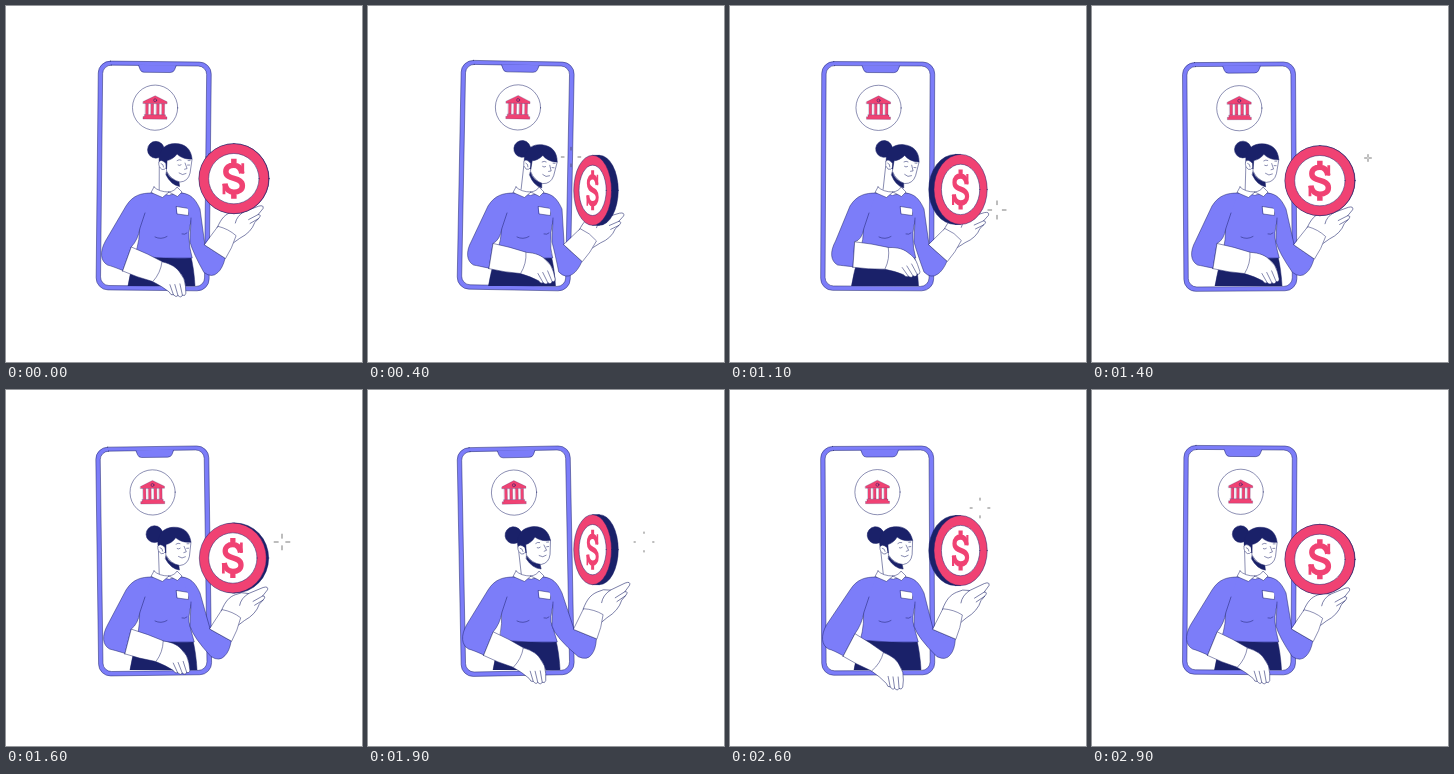
Recreate the animation shown at these times as an HTML page. Size 356x356 px, loop 3000 ms.

```html
<!DOCTYPE html>
<html lang="en">
<head>
<meta charset="utf-8">
<title>Mobile banking</title>
<style>
  html, body { margin: 0; width: 100%; height: 100%; overflow: hidden; background: #fff; }
  svg { display: block; width: 100vw; height: 100vh; }
  .line { fill: none; }
  .skin { fill: #fff; }
  .shirt { fill: #7c7df9; }
  .navy { fill: #1a2169; }
  .pink { fill: #f04273; }
</style>
</head>
<body>
<svg viewBox="0 0 356 356" stroke="#1a2169" stroke-width=".5" stroke-linejoin="round" stroke-linecap="round">
  <defs>
    <clipPath id="screen"><rect x="95" y="60" width="104" height="220" rx="8"/></clipPath>
  </defs>

  <g id="phone">
    <rect class="shirt" x="91.200" y="56" width="113" height="228.800" rx="12"/>
    <rect class="skin" x="95.600" y="60" width="104" height="220.400" rx="8.500"/>
    <path class="shirt" stroke="none" d="M131 59.500H169.500L167.500 64Q166.500 66.800 163 66.800H137Q134 66.800 133 64Z"/>
    <path class="line" d="M131.500 60L133 64Q134 66.800 137 66.800H163Q166.500 66.800 167.500 64L169 60"/>
  </g>

  <g id="bank">
    <circle class="skin" r="22.600"/>
    <g class="pink" stroke-width=".2">
      <path d="M-12-6L0-12L12-6V-4H-12Z"/>
      <path d="M-9.500-4h2.800v11h-2.800ZM-4.200-4h2.800v11h-2.800ZM1.400-4h2.800v11h-2.800ZM6.700-4h2.800v11h-2.800Z"/>
      <path d="M-10.500 7H10.500V9H12V11.500H-12V9H-10.500Z"/>
      <circle cy="-7.400" r="1.500" stroke-width=".5"/>
    </g>
  </g>

  <g clip-path="url(#screen)"><path id="skirt" class="navy"/></g>
  <path id="torso" class="shirt"/>

  <g id="head">
    <path class="skin" stroke="none" d="M153 158V184L163 189L171 183V168Z"/>
    <path class="line" d="M153.200 161V184"/>
    <path class="navy" d="M160.500 166Q164 174 173 175.500L173.500 180.500Q165 179 160 169Z"/>
    <path class="skin" d="M160 150L160.500 165Q165 174 174 176Q182 175.500 184 167L186 153L176 143Z"/>
    <circle class="navy" cx="149.800" cy="143.800" r="8.400"/>
    <path class="navy" d="M153 156C152 143 160 137.500 169 137.500C179 137.500 185 143 186 153C179 153.500 174 151 171 148C168 152 164 154 161 154.500L160.500 163Q158 161 157.500 157Z"/>
    <path class="skin" d="M159.500 157Q155 152.500 152.800 156Q152 161 156 163.500Q158.500 164 159.800 162"/>
    <path class="line" d="M155 157.500Q157.500 158 157.500 161M171 154.500Q173 153 175 154M182 154.500L184 154.500M172 159Q173.500 160 175 158.800M181.500 159L183.500 159M179 157L181 162.500L178.500 163.200M173 167Q176.500 170 180 167.500"/>
  </g>

  <path class="skin" d="M148 181L145 186.500L156.500 191.500L163 186Q153 186 148 181Z"/>
  <path class="skin" d="M163 186L171.500 190.500L176 186L171 181Q169 185 163 186Z"/>
  <path class="line" d="M149 231Q155 234 161 230.500M176 228Q179 229 181 227"/>
  <path class="skin" d="M170.500 200.500L183 202.500L182.300 209.500L171.300 208Z"/>

  <path id="armL" class="shirt"/>
  <g id="handL">
    <path class="skin" d="M-2-10.500C6-12 14-12 20-8Q28-4 31 3L34 9.500Q34.500 13 31.500 12.500Q31.500 16 27.500 14.500Q27 17.500 23 15.500Q21 17.500 18 14.500Q10 12-2 11Z"/>
    <path class="line" d="M31.500 12.500L25 3M27.500 14.500L20.500 5.500M23 15.500L16 7.500"/>
  </g>
  <path id="cuffL" class="skin"/>

  <path id="armR" class="shirt"/>
  <g id="handR">
    <path class="skin" d="M-5-9C3-14 8-15 14-13Q20-12 24-6L38-2Q43 0 40 2.500L33 4.500Q36 7 31 8L26 9Q18 15 6 13L-3 13Z"/>
    <path class="line" d="M33 4.500L23 3M31 8L22 7M24-6Q16-7 11-2"/>
  </g>
  <path id="cuffR" class="skin"/>

  <path id="spark" class="line" stroke="#444" stroke-width=".7"/>

  <g id="coin">
    <ellipse id="back" class="navy" ry="35"/>
    <rect id="edge" class="navy" y="-35" height="70"/>
    <g id="face">
      <circle class="pink" r="35" vector-effect="non-scaling-stroke"/>
      <circle class="skin" r="25.200" vector-effect="non-scaling-stroke"/>
      <path class="line" stroke="#f04273" stroke-width="5.500" stroke-linecap="butt"
        d="M8-5.500C7-11 4-13.500 0-13.500C-5-13.500-8-11-8-7C-8 2 8.500-2.500 8.500 7C8.500 11 5 13.500 0 13.500C-4 13.500-8 11-9 5M0-20V-13M0 13V20"/>
      <path class="pink" stroke="none" d="M7.500-15.500H10.300V-5H7.500ZM-11.300 5H-8.500V15.500H-11.300Z"/>
    </g>
  </g>
</svg>

<script>
const LOOP = 3000, STEP = 100;
const el = id => document.getElementById(id);
const set = (id, attrs) => { for (const k in attrs) el(id).setAttribute(k, attrs[k]); };
const place = (id, x, y, deg = 0, sx = 1) =>
  set(id, { transform: `translate(${x} ${y}) rotate(${deg}) scale(${sx} 1)` });
const wave = (t, peak) => Math.cos(2 * Math.PI * (t - peak) / LOOP);

// Maps limb coordinates (x along the limb) to the stage.
function limb(ox, oy, deg) {
  const a = deg * Math.PI / 180, c = Math.cos(a), s = Math.sin(a);
  return (x, y) => [ox + x * c - y * s, oy + x * s + y * c];
}

// Sparkle: x, y, start time
const sparks = [[203, 151, -100], [267, 204, 700], [276, 152, 1300], [250, 118, 2050]];
const SPARK_LIFE = 650;

function drawSparks(t) {
  let d = '';
  for (const [x, y, start] of sparks) {
    const u = (t - start) / SPARK_LIFE;
    if (u <= 0 || u >= 1) continue;
    const out = 10 * (1 - (1 - u) ** 2.5), inn = 9.5 * u ** 1.2;
    for (const [i, j] of [[1, 0], [-1, 0], [0, 1], [0, -1]])
      d += `M${x + i * inn} ${y + j * inn}L${x + i * out} ${y + j * out}`;
  }
  set('spark', { d });
}

// Two half turns per loop, each ending in a short rest face-on.
function drawCoin(t) {
  const u = Math.min(1, t % 1500 / 1400);
  const a = (180 * u + 2 + 4 * Math.sin(2 * Math.PI * u)) * Math.PI / 180;
  const w = Math.max(Math.abs(Math.cos(a)), .01);
  const off = 4 * Math.sin(a) * Math.sign(Math.cos(a));
  place('coin', 228, 172 + 16 * wave(t, 730));
  set('back', { cx: off, rx: 35 * w });
  set('edge', { x: -Math.abs(off), width: 2 * Math.abs(off) });
  set('face', { transform: `translate(${-off} 0) scale(${w} 1)` });
}

function drawLeftArm(t) {
  const a = wave(t, 2400), deg = 18 + 13 * a, left = 96 - 5 * a;
  const p = limb(106 - 1.5 * a, 247, deg);
  set('armL', { d: `M146 187C135 187 127 189 120 200L${left + 5} 235C${left - 1} 246 ${left} 255 ${left + 7} 259` +
    `Q${p(6, 12)} ${p(17, 12)}L${p(16, -13)}Q132 234 134 222L139 207` });
  set('cuffL', { d: `M${p(17, 12.5)}L${p(16, -13)}Q${p(34, -13)} ${p(50, -11)}Q${p(53, 0)} ${p(49, 11)}Q${p(32, 13)} ${p(17, 12.5)}Z` });
  place('handL', ...p(50, 0), deg);
}

function drawRightArm(t) {
  const c = wave(t, 730), s = wave(t, 1700);
  const p = limb(207 - 7 * c + 2.2 * s, 253 + c, -60 + 13 * c);
  set('armR', { d: `M176 187C184 188 189 192 194 203L${p(9, -12)}L${p(8, 12)}` +
    `Q${p(-2, 15)} ${p(-8, 13)}Q${p(-16, 11)} ${p(-15, 1)}Q187 247 184 236L185 212` });
  set('cuffR', { d: `M${p(9, -12.5)}L${p(8, 12.5)}Q${p(20, 13)} ${p(33, 10)}Q${p(35, 0)} ${p(32, -10)}Z` });
  place('handR', ...p(32, 0), -36 + 5 * c, 1.07 - .08 * c);
}

function draw(t) {
  const tilt = wave(t, 480);
  set('phone', { transform: `translate(0 ${-.8 * tilt}) rotate(${1.1 * tilt} 147.3 170)` });
  place('bank', 148 + 2 * tilt, 102 - .6 * tilt, 1.1 * tilt);

  const d = -2.5 * wave(t, 600), x = n => n + d;
  set('skirt', { d: `M${x(131)} 248L${x(185)} 248Q${x(189)} 262 ${x(190)} 284H${x(122)}Q${x(125)} 264 ${x(131)} 248Z` });
  set('torso', { d: `M146 187L163 189L176 187Q188 190 189 202Q182 222 183 232Q${x(184)} 242 ${x(187)} 252` +
    `Q${x(158)} 253 ${x(129)} 250Q135 234 133 216L131 192Z` });
  set('head', { transform: `rotate(${8.5 * wave(t, 740)} 160 183)` });

  drawLeftArm(t);
  drawRightArm(t);
  drawSparks(t);
  drawCoin(t);
}

// Poses advance in even steps; the small lead absorbs display latency.
function tick(now) {
  draw(Math.floor((now + 20) / STEP) * STEP % LOOP);
  requestAnimationFrame(tick);
}
draw(0);
requestAnimationFrame(tick);
</script>
</body>
</html>
```
